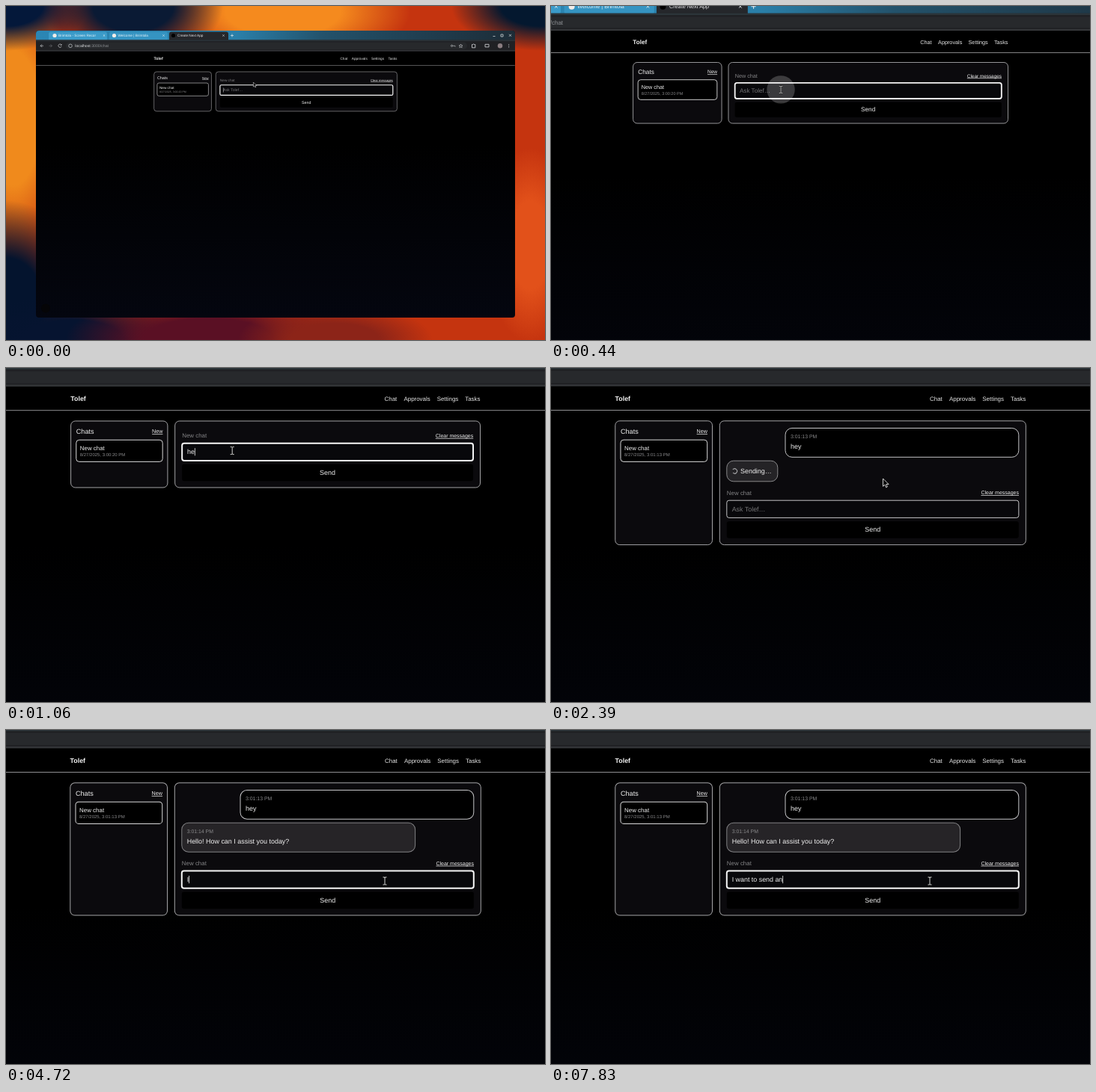
These frames come from a looping animation (720 by 447 pixels, 8000 ms). An HTML page:

```html
<!DOCTYPE html>
<html lang="en">
<head>
<meta charset="utf-8">
<title>Chat demo</title>
<style>
  html, body { margin: 0; width: 100%; height: 100%; overflow: hidden; background: #000; }
  svg { display: block; width: 720px; height: 447px; }
  text { font-family: "Liberation Sans", Arial, sans-serif; white-space: pre; text-rendering: geometricPrecision; }
  .hidden { display: none; }
</style>
</head>
<body>
<svg viewBox="0 0 720 447" xmlns="http://www.w3.org/2000/svg">
  <defs>
    <linearGradient id="strip">
      <stop offset="0" stop-color="#2b86b4"/>
      <stop offset=".42" stop-color="#2a7fa9"/>
      <stop offset=".6" stop-color="#23526b"/>
      <stop offset="1" stop-color="#1d2c37"/>
    </linearGradient>
    <linearGradient id="page" x2="0" y2="1">
      <stop offset=".4" stop-color="#000"/>
      <stop offset="1" stop-color="#04060f"/>
    </linearGradient>
    <clipPath id="frame"><rect x="40" y="33" width="640" height="384" rx="4"/></clipPath>
  </defs>
  <g id="camera">
    <g id="wallpaper"><rect width="720" height="447" fill="#c5340f"/></g>
    <g clip-path="url(#frame)">
      <rect x="40" y="33" width="640" height="384" fill="url(#page)"/>
      <rect x="40" y="33" width="640" height="14" fill="url(#strip)"/>
      <g id="chrome"></g>
      <circle cx="53" cy="404.5" r="6" fill="#050507"/>
    </g>
    <g id="content"></g>
  </g>
</svg>
<script>
const NS = 'http://www.w3.org/2000/svg';
const LOOP = 8000, ZOOM = 1.689, FOCUS_X = 360, FOCUS_Y = 113;
const SENT = 1780, REPLIED = 2900, CLICKS = [330, 3880], FADE = 400;
const byId = id => document.getElementById(id);

function add(parent, tag, attrs = {}, content = '') {
  const node = document.createElementNS(NS, tag);
  for (const key in attrs) node.setAttribute(key, attrs[key]);
  node.textContent = content;
  return parent.appendChild(node);
}
const set = (node, attrs) => { for (const key in attrs) node.setAttribute(key, attrs[key]); };
const show = (node, on) => node.classList.toggle('hidden', !on);
const group = (parent, attrs) => add(parent, 'g', attrs);
const label = (parent, x, y, size, fill, content, more = {}) =>
  add(parent, 'text', { x, y, 'font-size': size, fill, ...more }, content);
const box = (parent, x, y, width, height, rx, fill, stroke = 'none', line = 1) =>
  add(parent, 'rect', { x, y, width, height, rx, fill, stroke, 'stroke-width': line });
const path = (parent, d, stroke, line, fill = 'none') =>
  add(parent, 'path', { d, stroke, fill, 'stroke-width': line });
const dot = (parent, cx, cy, r, fill, stroke = 'none') =>
  add(parent, 'circle', { cx, cy, r, fill, stroke, 'stroke-width': 0.7 });

function buildWallpaper() {
  const blobs = [
    [10, 150, 80, 200, '#f08a1c'], [370, 8, 170, 70, '#f58a1e'], [700, 320, 60, 130, '#e2511a'],
    [0, 0, 110, 60, '#04183a'], [170, 0, 120, 75, '#0a1a34'], [715, 0, 120, 60, '#04182f'],
    [0, 400, 110, 140, '#04142e'], [90, 447, 150, 60, '#061430'],
    [270, 445, 190, 60, '#5a1024'], [440, 447, 130, 50, '#8c2418']
  ];
  const defs = document.querySelector('defs');
  blobs.forEach(([cx, cy, rx, ry, color], i) => {
    const gradient = add(defs, 'radialGradient', { id: 'glow' + i });
    add(gradient, 'stop', { offset: 0.45, 'stop-color': color });
    add(gradient, 'stop', { offset: 1, 'stop-color': color, 'stop-opacity': 0 });
    add(byId('wallpaper'), 'ellipse', { cx, cy, rx, ry, fill: `url(#glow${i})` });
  });
}

function buildChrome() {
  const g = byId('chrome'), ink = '#c8cacd';
  box(g, 57, 34.5, 78, 12.5, 3, '#3b9bc9');
  box(g, 138, 34.5, 78, 12.5, 3, '#3594c2');
  box(g, 218, 34.5, 79, 14, 3, '#25272b');
  box(g, 40, 45.4, 640, 15.1, 0, '#202124');
  box(g, 40, 45.4, 640, 1.5, 0, '#2c353a');
  box(g, 40, 59.2, 640, 1.3, 0, '#35373a');
  box(g, 80, 48.5, 536, 9.5, 4.7, '#27292c');
  dot(g, 65, 39.5, 2.6, '#f3ece8');
  dot(g, 144.5, 39.5, 2.6, '#f3ece8');
  dot(g, 223.5, 39.5, 2.6, '#000');
  label(g, 70, 41, 4.7, '#e8f3f8', 'Brimtola - Screen Recor');
  label(g, 149.5, 41, 4.7, '#e8f3f8', 'Welcome | Brimtola');
  label(g, 229, 41, 4.7, '#e4e4e6', 'Create Next App');
  for (const x of [131, 210.5, 290.5]) path(g, `M${x - 1.2} 38.3l2.4 2.4m0-2.4l-2.4 2.4`, '#e8eef2', 0.6);
  path(g, 'M300 39.5h4m-2-2v4M650.5 40.5h3M661 38h3v3h-3zM672 37.8l3 3m0-3l-3 3', '#e4e8ea', 0.7);
  path(g, 'M50 53.3h-4m2-2l-2 2 2 2M74 52a2.2 2.2 0 1 0 .2 2m0-3v1.4h-1.5', ink, 0.7);
  path(g, 'M57.5 53.3h4m-2-2l2 2-2 2', '#66686b', 0.7);
  dot(g, 86, 53.3, 2.3, 'none', ink);
  const address = label(g, 92.3, 55, 5.2, '#dcdde0', 'localhost');
  add(address, 'tspan', { fill: '#8d9094' }, ':3000/chat');
  dot(g, 595.5, 53.3, 1.1, 'none', ink);
  path(g, 'M596.8 53.3h3.2v1.3M607.5 51l.7 1.7 1.8.1-1.4 1.1.5 1.8-1.6-1-1.6 1 .5-1.8-1.4-1.1 1.8-.1z', ink, 0.6);
  path(g, 'M622.5 51.5h1.2a.9.9 0 0 1 1.7 0h1.4v4.3h-4.3zM640 51.3h5v3.6h-5z', ink, 0.9);
  dot(g, 660, 53.3, 3.2, '#8a7d80');
  for (const y of [51.5, 53.3, 55.1]) dot(g, 671.7, y, 0.55, ink);
}

buildWallpaper();
buildChrome();

const page = byId('content');
set(page, { transform: `translate(${FOCUS_X} ${FOCUS_Y}) scale(${1 / ZOOM}) translate(${-FOCUS_X} ${-FOCUS_Y})` });
const PANEL = '#0b0a0d', WHITE = '#f1f1f1', MUTED = '#8a8a8c', EDGE = '#a4a4a6';

label(page, 85.5, 43.8, 8.9, WHITE, 'Tolef', { 'font-weight': 'bold' });
[[506, 'Chat'], [532, 'Approvals'], [576.3, 'Settings'], [614, 'Tasks']]
  .forEach(([x, name]) => label(page, x, 43.8, 7.95, '#e6e6e6', name));
box(page, -180, 56, 1080, 1, 0, '#8f8f91');

const sidebar = box(page, 85.8, 70.8, 129.7, 90, 6, PANEL, EDGE);
const main = box(page, 225.3, 70.8, 409, 90, 6, PANEL, EDGE);
label(page, 93, 87.5, 9.1, WHITE, 'Chats');
label(page, 209, 87.2, 7.2, WHITE, 'New', { 'text-anchor': 'end', 'text-decoration': 'underline' });
box(page, 93, 96.2, 115.7, 29.2, 4, '#000', '#d8d8d8');
label(page, 98, 109.6, 7.95, WHITE, 'New chat');
const stamp = label(page, 98, 118.4, 6, MUTED, '');

const question = group(page);
box(question, 313, 80.5, 311.8, 38.8, 9, '#000', '#c4c4c6');
label(question, 320, 94.4, 6.9, MUTED, '3:01:13 PM');
label(question, 320, 108, 8.95, WHITE, 'hey');

const sending = group(page);
box(sending, 234.8, 124.2, 68, 27.6, 9, '#242326', '#8a8a8c');
const spinner = add(sending, 'circle', {
  cx: 245.3, cy: 138, r: 3.2, fill: 'none', stroke: '#a9a9ab', 'stroke-width': 1.1, 'stroke-dasharray': '15 5.1'
});
label(sending, 253, 141.1, 8.95, WHITE, 'Sending…');

const reply = group(page);
box(reply, 234.8, 124.2, 311.8, 39, 9, '#262427', '#818183');
label(reply, 241.7, 138, 6.9, MUTED, '3:01:14 PM');
label(reply, 241.7, 152, 8.95, WHITE, 'Hello! How can I assist you today?');

const form = group(page);
label(form, 234.8, 169.8, 7.95, '#838385', 'New chat');
label(form, 625, 169.3, 7, WHITE, 'Clear messages', { 'text-anchor': 'end', 'text-decoration': 'underline' });
const field = box(form, 234.8, 177.2, 390, 23.2, 3, '#08080b');
box(form, 234.8, 205.2, 390, 22.6, 3, '#000');
label(form, 429.7, 219.3, 8.95, WHITE, 'Send', { 'text-anchor': 'middle' });
const entry = label(form, 241.7, 191.6, 8.9, WHITE, '');
const caret = box(form, 0, 183.6, 0.8, 10.2, 0, WHITE);

const ripple = dot(page, 0, 0, 0, '#fff');
const pointer = group(page);
const arrow = path(pointer, 'M0 0V10.4L2.4 8.2 4.1 11.8 5.8 11 4.2 7.6H7.6Z', '#e8e8e8', 0.9, '#000');
const beam = group(pointer);
const beamShape = 'M-2.5 -5H-.8L0 -4.4.8 -5H2.5M0 -4.4V4.4M-2.5 5H-.8L0 4.4.8 5H2.5';
path(beam, beamShape, '#000', 2);
path(beam, beamShape, '#dcdcdc', 1);

const track = [
  [0, 310, 94.4], [350, 302, 110.6], [1750, 302, 110.6], [2320, 443.5, 148], [2560, 443.5, 148],
  [2950, 545, 40], [3390, 573, 128], [3600, 573, 128], [3880, 506, 202]
];
const greeting = 'hey', greetingTimes = [890, 1000, 1150];
const request = 'I want to send an';
const requestTimes = [
  4720, 5000, 5170, 5440, 5670, 5840, 6060, 6170, 6390, 6500, 6720, 6890, 7060, 7330, 7560, 7830, 7830
];
const typed = (text, times, t) => text.slice(0, times.filter(at => at <= t).length);
const blinkOn = t => Math.floor((t + 220) / 500) % 2 === 0;

function pointerAt(t) {
  const next = track.findIndex(p => p[0] > t);
  if (next < 0) return track[track.length - 1].slice(1);
  const [a, b] = [track[next - 1], track[next]];
  const f = (t - a[0]) / (b[0] - a[0]), s = f * f * (3 - 2 * f);
  return [a[1] + (b[1] - a[1]) * s, a[2] + (b[2] - a[2]) * s];
}

function moveCamera(t) {
  const w = 0.0066 * t, rest = (1 + w) * Math.exp(-w);
  const zoom = 1 + (ZOOM - 1) * (1 - rest), focus = FOCUS_Y - 9 * rest;
  set(byId('camera'), {
    transform: `translate(${FOCUS_X} ${focus}) scale(${zoom}) translate(${-FOCUS_X} ${-focus})`
  });
}

function drawChat(t) {
  const sent = t >= SENT, replied = t >= REPLIED;
  const shift = replied ? 11.4 : sent ? 0 : -76.5;
  const focused = !sent || t >= CLICKS[1];
  set(sidebar, { height: 165.8 + shift });
  set(main, { height: 165.8 + shift });
  stamp.textContent = `8/27/2025, ${sent ? '3:01:13' : '3:00:20'} PM`;
  show(question, sent);
  show(sending, sent && !replied);
  show(reply, replied);
  set(spinner, { transform: `rotate(${(t - SENT) * 0.36} 245.3 138)` });

  set(form, { transform: `translate(0 ${shift})` });
  set(field, { stroke: focused ? '#f6f6f6' : '#c4c4c6', 'stroke-width': focused ? 2 : 1 });
  const value = sent ? typed(request, requestTimes, t) : typed(greeting, greetingTimes, t);
  entry.textContent = value || 'Ask Tolef…';
  set(entry, { fill: value ? WHITE : '#757577' });
  show(caret, focused && (value || blinkOn(t)));
  set(caret, { x: 241.7 + (value ? entry.getComputedTextLength() : 0) });
  return 177 + shift;
}

function drawPointer(t, fieldTop) {
  const [x, y] = pointerAt(t);
  const overField = y > fieldTop && y < fieldTop + 24;
  set(pointer, { transform: `translate(${x} ${y})` });
  show(arrow, !overField);
  show(beam, overField);
  const click = CLICKS.find(at => t >= at && t < at + FADE);
  show(ripple, click !== undefined);
  if (click === undefined) return;
  const age = (t - click) / FADE;
  set(ripple, { cx: x, cy: y, r: 20.5 * Math.min(1, age * 4), opacity: 0.28 * (1 - age) });
}

function render(t) {
  moveCamera(t);
  drawPointer(t, drawChat(t));
}

const start = performance.now();
function tick() {
  render((performance.now() - start) % LOOP);
  requestAnimationFrame(tick);
}
render(0);
requestAnimationFrame(tick);
</script>
</body>
</html>
```
